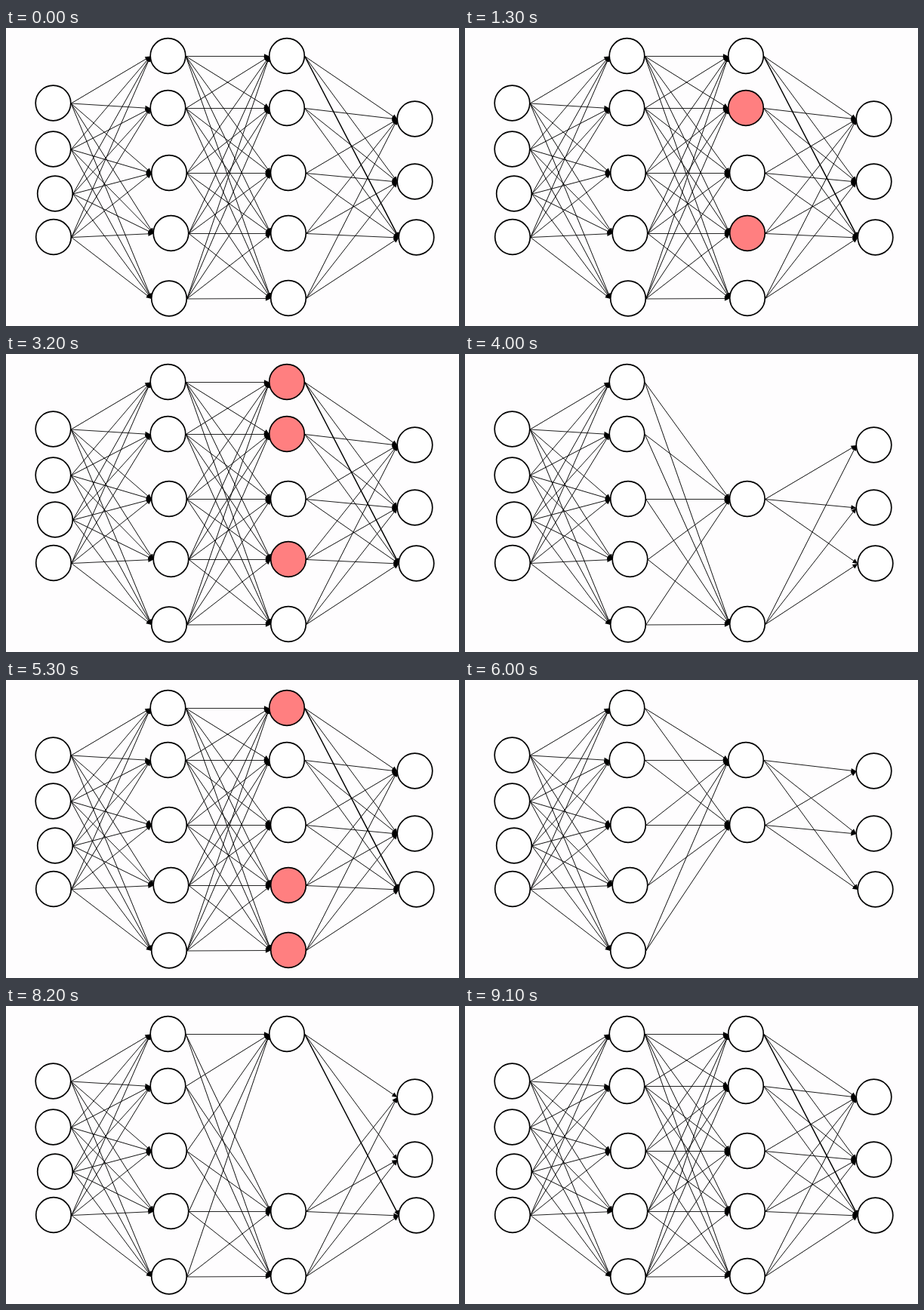
An HTML page with a canvas that plays this animation: 600 px wide and 395 px high, repeating every 10 s.

```html
<!DOCTYPE html>
<html lang="en">
<head>
<meta charset="utf-8">
<title>Dropout in a neural network</title>
<style>
html, body { margin: 0; width: 100%; height: 100%; overflow: hidden; background: #fefdfe; }
canvas { display: block; }
</style>
</head>
<body>
<canvas id="stage" width="600" height="395"></canvas>
<script>
const ctx = document.getElementById('stage').getContext('2d');
const LOOP = 10000, R = 23.3;

// Node centres, layer by layer
const layers = [
  [[62.5, 99.5], [62.5, 160.5], [65, 219.5], [63, 277]],
  [[214.5, 37], [214.5, 106], [216, 192], [218.5, 272], [216, 358.5]],
  [[372, 37], [372, 106], [373.8, 192], [374, 272], [374, 358]],
  [[541.5, 120.5], [541.5, 203.5], [543.5, 277.5]]
];
const DROP_LAYER = 2;

// Each round: marked red, dropped, restored; nodes of the drop layer
const rounds = [
  { mark: 1300, drop: 1900, restore: 2600, nodes: [1, 3] },
  { mark: 3200, drop: 3900, restore: 4600, nodes: [0, 1, 3] },
  { mark: 5300, drop: 6000, restore: 6700, nodes: [0, 3, 4] },
  { mark: 7500, drop: 8200, restore: 8900, nodes: [1, 2] }
];

function circle([x, y], fill) {
  ctx.beginPath();
  ctx.arc(x, y, R, 0, 2 * Math.PI);
  ctx.fillStyle = fill;
  ctx.fill();
  ctx.lineWidth = 1.7;
  ctx.stroke();
}

function arrow([ax, ay], [bx, by], width) {
  const x1 = ax + R + 0.4, y1 = ay + 0.5;
  const x2 = bx - R + 0.2, y2 = by + 0.5;
  const angle = Math.atan2(y2 - y1, x2 - x1);
  const length = Math.hypot(x2 - x1, y2 - y1);
  ctx.save();
  ctx.translate(x1, y1);
  ctx.rotate(angle);
  ctx.lineWidth = width;
  ctx.beginPath();
  ctx.moveTo(0, 0);
  ctx.lineTo(length - 3, 0);
  ctx.stroke();
  ctx.fillStyle = '#000';
  ctx.beginPath();
  ctx.moveTo(length, 0);
  ctx.lineTo(length - 7, -3.2);
  ctx.lineTo(length - 7, 3.2);
  ctx.fill();
  ctx.restore();
}

function draw(time) {
  const t = time % LOOP;
  const round = rounds.find(r => t >= r.mark && t < r.restore);
  const chosen = (layer, i) => round && layer === DROP_LAYER && round.nodes.includes(i);
  const dropped = (layer, i) => chosen(layer, i) && t >= round.drop;

  ctx.fillStyle = '#fefdfe';
  ctx.fillRect(0, 0, 600, 395);
  ctx.strokeStyle = '#000';

  layers.forEach((nodes, layer) => nodes.forEach((node, i) => {
    if (!dropped(layer, i)) circle(node, chosen(layer, i) ? '#ff7f80' : '#fff');
  }));

  layers.slice(0, -1).forEach((nodes, layer) => nodes.forEach((from, i) => {
    if (dropped(layer, i)) return;
    layers[layer + 1].forEach((to, j) => {
      const heavy = layer === 2 && i === 0 && j === 2;
      if (!dropped(layer + 1, j)) arrow(from, to, heavy ? 1.5 : 0.85);
    });
  }));
}

function frame() {
  draw(performance.now());
  requestAnimationFrame(frame);
}
frame();
</script>
</body>
</html>
```
